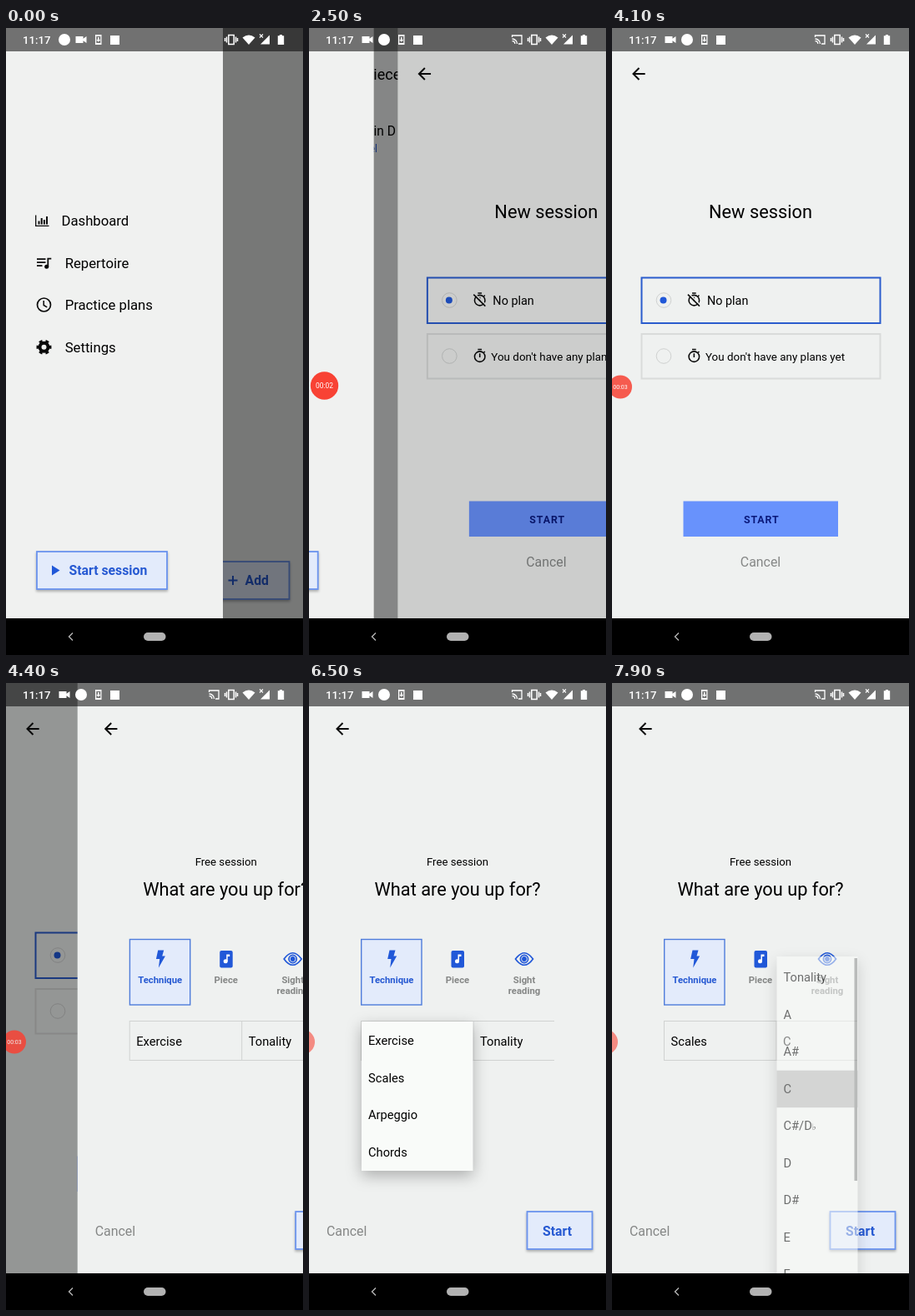
An HTML page that plays this animation: 356x752 px, repeating every 8 s.

```html
<!DOCTYPE html>
<html lang="en">
<head>
<meta charset="utf-8">
<title>Practice session</title>
<style>
  html, body { margin: 0; width: 100%; height: 100%; overflow: hidden; background: #000; }
  svg { display: block; width: 100%; height: 100%; font-family: Roboto, sans-serif; }
  .line { fill: none; stroke: #0b0b0b; stroke-width: 2; }
  .body { font-size: 14.7px; }
  .menu { font-size: 16.7px; }
  .title { font-size: 21.8px; text-anchor: middle; }
  .btn { font-size: 15.8px; font-weight: 700; fill: #2659d2; }
  .muted { font-size: 15.9px; fill: #858786; }
  .tab { font-size: 11.3px; font-weight: 700; fill: #858786; text-anchor: middle; }
  .box { fill: #e3ebfb; stroke: #6a93ee; stroke-width: 1.8; filter: drop-shadow(0 2px 1.5px rgba(0,0,0,.28)); }
  .pop { filter: drop-shadow(0 6px 9px rgba(0,0,0,.28)); }
</style>
</head>
<body>
<svg id="stage" viewBox="0 0 356 752">
  <defs>
    <path id="back" class="line" d="M39.7 55H26M32.5 48l-7 7 7 7"/>
    <g id="timer" class="line">
      <circle cx="12" cy="13" r="8"/>
      <path d="M9 2h6M12 8v6M18 7l1.8-1.8"/>
    </g>
    <rect id="page" width="356" height="752" fill="#eff1f0"/>
  </defs>

  <g id="home">
    <use href="#page"/>
    <text x="66" y="62" font-size="18">Pieces</text>
    <text x="104" y="129" font-size="15.6" text-anchor="end">Waltz in D</text>
    <text x="82" y="149" font-size="12" fill="#2659d2" text-anchor="end">Morvel</text>
    <rect class="box" x="246" y="640" width="93.5" height="45"/>
    <path d="M266.500 662.500h11M272 657v11" stroke="#2659d2" stroke-width="2"/>
    <text class="btn" x="286.500" y="668">Add</text>
  </g>
  <rect id="homeDim" width="356" height="752"/>

  <g id="setup">
    <use href="#page"/>
    <use href="#back"/>
    <text class="title" x="178" y="227.600">New session</text>
    <rect x="35.500" y="299.500" width="286" height="54.500" fill="none" stroke="#2a5ccd" stroke-width="2"/>
    <rect x="35.500" y="367" width="286" height="53.500" fill="none" stroke="#d9dbda" stroke-width="2"/>
    <g fill="none" stroke="#cfd1d0"><circle cx="62" cy="326.500" r="8.800"/><circle cx="62" cy="393.500" r="8.800"/></g>
    <circle cx="61.500" cy="326.500" r="4" fill="#2158d8"/>
    <g transform="translate(89 316.500) scale(.78)">
      <use href="#timer"/>
      <path d="M4 2.500L22 20.500" stroke="#eff1f0" stroke-width="2"/>
      <path class="line" d="M2.500 4L20.500 22"/>
    </g>
    <use href="#timer" transform="translate(89 384) scale(.78)"/>
    <text x="114" y="332" font-size="14.400">No plan</text>
    <text x="112" y="399" font-size="13.400">You don't have any plans yet</text>
    <rect x="85.500" y="567.500" width="185.500" height="42.500" fill="#6892fc"/>
    <text x="179.300" y="594" font-size="12.400" font-weight="700" letter-spacing=".9" fill="#0b1a7c" text-anchor="middle">START</text>
    <text class="muted" x="178" y="646" text-anchor="middle">Cancel</text>
  </g>
  <rect id="setupDim" width="356" height="752"/>

  <g id="free">
    <use href="#page"/>
    <use href="#back" x="8"/>
    <text x="178" y="219" font-size="13.200" text-anchor="middle">Free session</text>
    <text class="title" x="178" y="255">What are you up for?</text>
    <rect x="62.700" y="307.500" width="72.300" height="78.500" fill="#e3ebfb" stroke="#4f7cdb" stroke-width="1.400"/>
    <path d="M96.500 320.500h7l-2 7h3.700l-8 14 1.300-10.500h-4.300z" fill="#2158d8"/>
    <text class="tab" x="99" y="360" style="fill:#2659d2">Technique</text>
    <rect x="170.500" y="321" width="15.500" height="20.500" rx="2" fill="#2158d8"/>
    <path d="M178.500 333.500v-8h4v2.500h-2.500v6" fill="#fff"/>
    <circle cx="177.500" cy="333.800" r="2.500" fill="#fff"/>
    <text class="tab" x="178" y="360">Piece</text>
    <g fill="none" stroke="#2158d8" stroke-width="1.700">
      <path d="M247.500 331Q258 316.500 268.500 331Q258 345.500 247.500 331z"/>
      <circle cx="258" cy="331" r="4.600"/>
    </g>
    <circle cx="258" cy="331" r="2.900" fill="#2158d8"/>
    <text class="tab" x="258" y="360">Sight</text>
    <text class="tab" x="258" y="373">reading</text>
    <path d="M62.500 405.500H294M62.500 452.500H294M62.500 405v48M197 405v48" fill="none" stroke="#d0d2d1"/>
    <text id="kind" class="body" x="70.500" y="435"></text>
    <text id="key" class="body" x="205" y="435"></text>
    <text class="muted" x="21" y="662.500">Cancel</text>
    <rect class="box" x="261.500" y="634" width="78" height="45"/>
    <text class="btn" x="280" y="662.500">Start</text>
    <g id="kinds"></g>
    <g id="keys"></g>
  </g>

  <rect id="drawerDim" width="356" height="752"/>
  <g id="drawer">
    <rect width="260" height="752" fill="#f0f1f0"/>
    <path d="M35.700 224.500v12.800h15.800" class="line" style="stroke-width:1.300"/>
    <path d="M39.500 235.500v-4M42.700 235.500v-7.500M45.900 235.500v-5.500M49 235.500v-9.500" class="line"/>
    <path d="M37 277.200h10.500M37 281.200h10.500M37 285.200h6.500" class="line" style="stroke-width:1.800"/>
    <path d="M50.300 286v-9.300h4" class="line" style="stroke-width:1.800"/>
    <circle cx="48.700" cy="286.200" r="2.500"/>
    <circle cx="45.500" cy="332" r="8" class="line" style="stroke-width:1.700"/>
    <path d="M45.200 327v5.500l4 2.400" class="line" style="stroke-width:1.500"/>
    <circle cx="45.500" cy="382.700" r="5" class="line" style="stroke-width:4"/>
    <circle cx="45.500" cy="382.700" r="7.500" class="line" pathLength="12" stroke-dasharray="1 1" stroke-dashoffset=".5" style="stroke-width:3"/>
    <g class="menu">
      <text x="66.500" y="237.300">Dashboard</text>
      <text x="70.700" y="288">Repertoire</text>
      <text x="70.700" y="338.300">Practice plans</text>
      <text x="70.700" y="389">Settings</text>
    </g>
    <rect class="box" x="37" y="628" width="156" height="45"/>
    <path d="M55 644.500v12l9.500-6z" fill="#2158d8"/>
    <text class="btn" x="75.500" y="656">Start session</text>
  </g>

  <g id="bubble">
    <circle id="disc" fill="#f84234"/>
    <text id="clock" fill="#fff" text-anchor="middle"></text>
  </g>

  <rect width="356" height="28" fill-opacity=".53"/>
  <g fill="#fff">
    <text x="20" y="19" font-size="13.200" font-weight="500">11:17</text>
    <circle id="badge" cy="14" r="7"/>
    <path id="camera" d="M-6.500 10h9v2.800l4-2.800v8l-4-2.800v2.800h-9z"/>
    <path d="M107 8h7.500v12H107zM108.300 10v8h5v-8z" fill-rule="evenodd"/>
    <path d="M110 11h1.500v3h1.800l-2.500 2.700-2.600-2.700h1.800z"/>
    <rect x="125" y="9" width="11" height="11"/>
    <g id="cast" fill="none" stroke="#fff" stroke-width="1.300">
      <path d="M243.500 11V9h11.500v10h-4M243.500 13a6 6 0 0 1 6 6M243.500 15.700a3.300 3.300 0 0 1 3.300 3.300"/>
    </g>
    <path d="M266.800 8.500h6.400v11h-6.400zM264.500 10.500v7M275.500 10.500v7M262.500 12v4M277.500 12v4" fill="none" stroke="#fff" stroke-width="1.500"/>
    <path d="M283.500 11.500Q291 5.500 298.500 11.500L291 20z"/>
    <path d="M316 8.500v11h-11z"/>
    <path d="M304 7.500l4 4M308 7.500l-4 4" stroke="#fff" stroke-width="1.100"/>
    <path d="M328 8h3v1.200h2.200V20h-7.400V9.200h2.200z"/>
  </g>

  <rect y="708" width="356" height="44"/>
  <path d="M80 725.500l-4.500 4.500 4.500 4.500" fill="none" stroke="#b4b4b4" stroke-width="1.400"/>
  <rect x="165" y="725" width="26.500" height="10" rx="5" fill="#b2b2b2"/>
</svg>

<script>
const LOOP = 8000, ROW = 44.5;
const el = {};
document.querySelectorAll('[id]').forEach(n => el[n.id] = n);

const set = (n, attrs) => { for (const k in attrs) n.setAttribute(k, attrs[k]); };
const ramp = (t, a, b) => Math.min(1, Math.max(0, (t - a) / (b - a)));
const smooth = (t, a, b) => { const u = ramp(t, a, b); return u * u * (3 - 2 * u); };
const mix = (a, b, u) => a + (b - a) * u;

// Share of a page slide still to go
const slide = (t, start) => {
  const left = t < start ? 1 : Math.exp((start - t) / 125);
  return left < .002 ? 0 : left;
};

function menu(node, x, y, w, h, first, items, picked) {
  const rows = items.map((s, i) =>
    `<text class="body" x="${x + 8}" y="${first + i * ROW}">${s}</text>`).join('');
  node.innerHTML = `<rect class="pop" x="${x}" y="${y}" width="${w}" height="${h}" fill="#f9fbf9"/>` +
    `<rect class="press" x="${x}" y="${first - 27 + picked * ROW}" width="${w}" height="${ROW}"/>` + rows;
  return node.querySelector('.press');
}

const flat = '<tspan font-size="10.5">♭</tspan>';
const kindPress = menu(el.kinds, 63, 406, 133.5, 179, 434.3,
  ['Exercise', 'Scales', 'Arpeggio', 'Chords'], 1);
const keyPress = menu(el.keys, 197.5, 328, 97, 400, 358.2,
  ['Tonality', 'A', 'A#', 'C', `C#/D${flat}`, 'D', 'D#', 'E', 'F'], 3);
el.keys.insertAdjacentHTML('beforeend',
  '<rect x="290.5" y="330" width="3.5" height="267" fill="#8c8e8d"/>');

function drawBubble(t) {
  const shrink = smooth(t, 2900, 3150), hide = smooth(t, 5400, 5700);
  const x = mix(mix(18.5, 10, shrink), -8, hide);
  const y = mix(429, 430.5, shrink);
  const secs = Math.max(0, Math.floor((t - 390) / 1005));
  set(el.bubble, { opacity: ramp(t, 200, 350) * mix(mix(1, .85, shrink), .58, hide) });
  set(el.disc, { cx: x, cy: y, r: mix(mix(16.7, 14, shrink), 15, hide) });
  set(el.clock, { x, y: y + 2.8, 'font-size': mix(8.4, 7, shrink), opacity: 1 - hide });
  el.clock.textContent = '00:0' + secs;
}

function render(t) {
  const a = slide(t, 2350), b = slide(t, 4223);
  set(el.homeDim, { opacity: .5 * (1 - a) });
  set(el.setup, { transform: `translate(${356 * a})` });
  set(el.setupDim, { opacity: .5 * (1 - b) });
  set(el.free, { transform: `translate(${356 * b})` });
  set(el.drawerDim, { opacity: .5 * a });
  set(el.drawer, { transform: `translate(${260 * (a - 1)})` });

  const recording = t >= 100;
  set(el.badge, { cx: recording ? 90 : 70 });
  set(el.camera, { transform: `translate(${recording ? 70 : 90})` });
  set(el.cast, { opacity: +recording });
  drawBubble(t);

  set(el.kinds, { opacity: ramp(t, 6080, 6260) - ramp(t, 6720, 6880) });
  set(kindPress, { opacity: .2 * ramp(t, 6580, 6700) });
  set(el.keys, { opacity: ramp(t, 6980, 7160) - ramp(t, 7832, 7983) });
  set(keyPress, { opacity: .24 * ramp(t, 7580, 7750) });
  el.kind.textContent = t < 6720 ? 'Exercise' : 'Scales';
  el.key.textContent = t < 7832 ? 'Tonality' : 'C';
}

function tick() {
  render(performance.now() % LOOP);
  requestAnimationFrame(tick);
}
tick();
</script>
</body>
</html>
```
